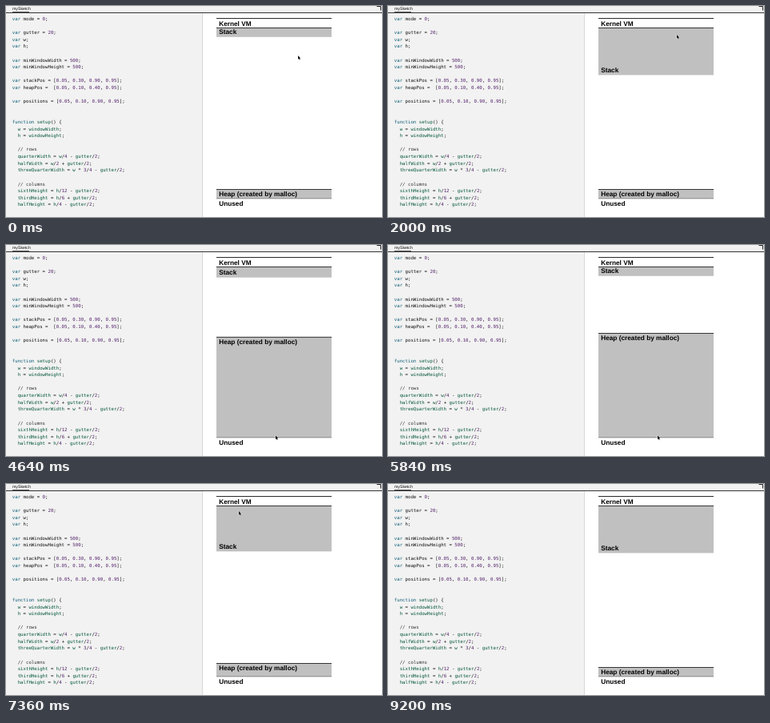
An HTML page that plays this animation: 470 px wide and 264 px high, repeating every 9.36 s.

```html
<!DOCTYPE html>
<html lang="en">
<head>
<meta charset="utf-8">
<title>Stack and heap</title>
<style>
html, body { margin: 0; width: 100%; height: 100%; overflow: hidden; background: #fff; }
svg { display: block; width: 470px; height: 264px; }
text { white-space: pre; text-rendering: geometricPrecision; }
.code { font: 5.71px "DejaVu Sans Mono", "Liberation Mono", monospace; fill: #111; }
.tab { font: 5.2px "Liberation Sans", Arial, sans-serif; fill: #111; }
.label { font: bold 8.28px "Liberation Sans", Arial, sans-serif; }
.key { fill: #0f5f78; }
.num { fill: #52206a; }
.name { fill: #00553a; }
.note { fill: #333; }
.fill { fill: #c0c0c0; }
.line { fill: #111; }
</style>
</head>
<body>
<svg viewBox="0 0 470 264">
  <rect width="470" height="264" fill="#fff"/>
  <rect width="245.5" height="264" fill="#f2f2f2"/>
  <rect width="470" height="8" fill="#f2f2f2"/>
  <rect y="8" width="470" height="1" fill="#333"/>
  <rect x="8" y="7" width="21" height="1" fill="#555"/>
  <path d="M245.5 9V264" stroke="#d0d0d0" stroke-width=".8"/>
  <path d="M463.5 .5H468.5V5.5" fill="none" stroke="#222" stroke-width="1"/>
  <text class="tab" x="8" y="5.2">mySketch</text>
  <g id="code"></g>
  <rect class="line" x="263" y="15" width="144" height=".9"/>
  <g id="stack">
    <rect class="fill" x="263" width="144"/>
    <rect class="line" x="263" width="144" height=".8"/>
    <text class="label" x="266.2">Stack</text>
  </g>
  <g id="heap">
    <rect class="fill" x="263" width="144"/>
    <rect class="line" x="263" width="144" height=".8"/>
    <text class="label" x="266.2">Heap (created by malloc)</text>
  </g>
  <rect class="line" x="263" y="240.7" width="144" height=".5" opacity=".7"/>
  <text class="label" x="266.2" y="24.5">Kernel VM</text>
  <text class="label" x="266.2" y="250.2">Unused</text>
  <path id="cursor" d="M0 0V4.6L1.1 3.7L1.9 5.4L2.7 5L1.9 3.4H3.3Z" fill="#000" stroke="#fff" stroke-width=".7" paint-order="stroke"/>
</svg>
<script>
const LOOP = 9360, STEP = 80;
const $ = id => document.getElementById(id);

const source = `var mode = 0;

var gutter = 20;
var w;
var h;

var minWindowWidth = 500;
var minWindowHeight = 500;

var stackPos = [0.05, 0.30, 0.90, 0.95];
var heapPos =  [0.05, 0.10, 0.40, 0.95];

var positions = [0.05, 0.10, 0.90, 0.95];


function setup() {
  w = windowWidth;
  h = windowHeight;

  // rows
  quarterWidth = w/4 - gutter/2;
  halfWidth = w/2 + gutter/2;
  threeQuarterWidth = w * 3/4 - gutter/2;

  // columns
  sixthHeight = h/12 - gutter/2;
  thirdHeight = h/6 + gutter/2;
  halfHeight = h/4 - gutter/2;`;

const span = (kind, s) => `<tspan class="${kind}">${s}</tspan>`;

function paint(line) {
  if (line.includes("//")) return span("note", line);
  const inBody = !line.startsWith("var");
  return line.replace(/[a-zA-Z]+|\d[\d.]*/g, s =>
    /^\d/.test(s) ? span("num", s) :
    /^(var|function)$/.test(s) ? span("key", s) :
    inBody ? span("name", s) : s);
}

$("code").innerHTML = source.split("\n").map((line, i) =>
  `<text class="code" x="7.8" y="${(17.9 + i * 8.61).toFixed(2)}">${paint(line)}</text>`).join("");

// Each click sets new targets: [time, stack bottom, heap top] as shares of the height.
const clicks = [
  [0, 0.10, 0.90],
  [700, 0.30, 0.90],
  [4128, 0.10, 0.40],
  [6862, 0.30, 0.90]
];

// [time, x, y]
const path = [
  [0, 365, 62], [80, 365, 62], [520, 361, 36], [2000, 361, 36],
  [2900, 347, 70], [3760, 335.6, 236], [4000, 335.6, 236], [4480, 337, 238.6],
  [5840, 337, 238.6], [6640, 291, 34], [8000, 291, 34], [8560, 298, -8], [LOOP, 298, -8]
];

const mix = (a, b, k) => a + (b - a) * k;
const toY = share => 15 + 238 * share;

function edges(t) {
  let pos = clicks[0].slice(1);
  for (let i = 1; i < clicks.length && t > clicks[i][0]; i++) {
    const end = i + 1 < clicks.length ? Math.min(t, clicks[i + 1][0]) : t;
    const k = 1 - Math.pow(0.9, (end - clicks[i][0]) * 0.06);
    pos = pos.map((v, j) => mix(v, clicks[i][j + 1], k));
  }
  return pos.map(toY);
}

function pointer(t) {
  const i = path.findIndex(p => p[0] > t);
  const a = path[i - 1], b = path[i];
  const u = (t - a[0]) / (b[0] - a[0]);
  const k = u * u * (3 - 2 * u);
  return [mix(a[1], b[1], k), mix(a[2], b[2], k)];
}

function block(id, top, bottom, baseline) {
  const [fill, line, label] = $(id).children;
  fill.setAttribute("y", top);
  fill.setAttribute("height", bottom - top);
  line.setAttribute("y", top);
  label.setAttribute("y", baseline);
}

function draw(t) {
  const [stackEnd, heapTop] = edges(t);
  block("stack", toY(0.05), stackEnd, stackEnd - 3.4);
  block("heap", heapTop, toY(0.95), heapTop + 9.2);
  $("cursor").setAttribute("transform", `translate(${pointer(t)})`);
}

const start = performance.now();
function tick() {
  const t = (performance.now() - start) % LOOP;
  draw(Math.floor(t / STEP) * STEP);
  requestAnimationFrame(tick);
}
tick();
</script>
</body>
</html>
```
